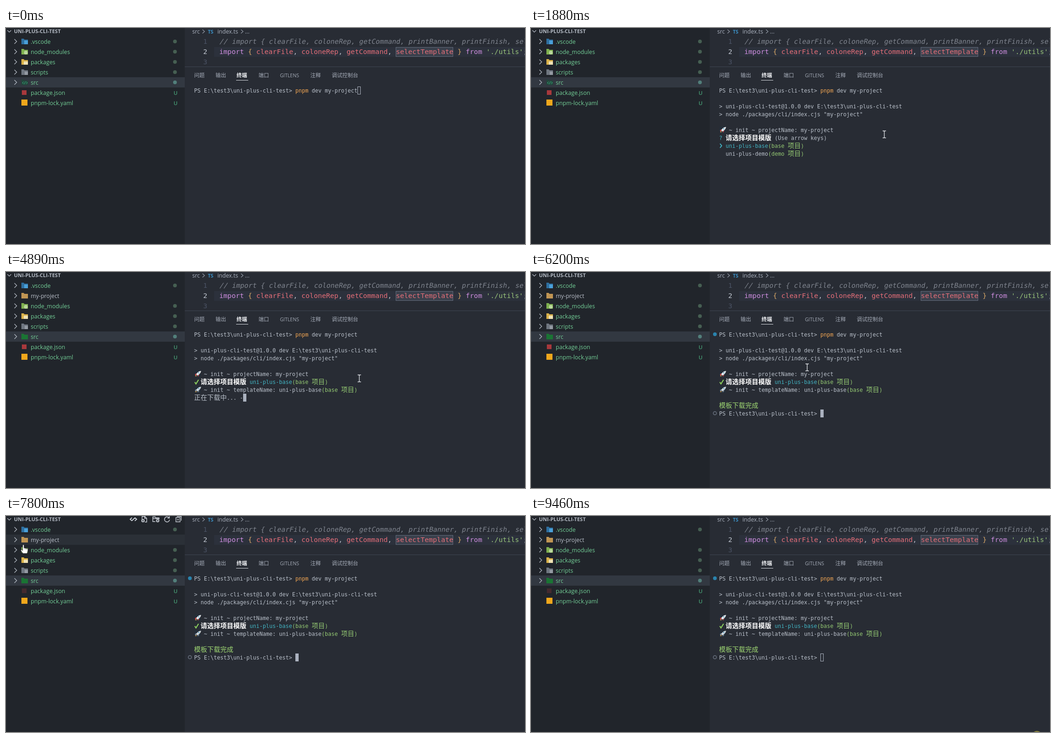
Animation, 1112 px wide and 465 px high, one loop 9.51 s. Source, as an HTML page:

```html
<!DOCTYPE html>
<html lang="zh-CN">
<head>
<meta charset="utf-8">
<title>Terminal session</title>
<style>
html, body { margin: 0; width: 100%; height: 100%; overflow: hidden; background: #282c34; }
svg { display: block; }
text { white-space: pre; }
.ui { font: 12.2px "Open Sans", "Noto Sans", sans-serif; }
.mono { font-family: "DejaVu Sans Mono", "Noto Sans Mono", monospace; font-size: 11.63px; }
.code { font: 14.62px "DejaVu Sans Mono", "Noto Sans Mono", monospace; }
.cjk { font-family: "Noto Sans CJK SC", "Noto Sans CJK", "Noto Sans CJK JP", sans-serif; }
</style>
</head>
<body>
<svg id="stage" width="1112" height="465" viewBox="0 0 1112 465"></svg>
<script>
const LOOP = 9510;
const stage = document.getElementById('stage');
const GRAY = '#b9c0ca', CYAN = '#42b3c2', GREEN = '#94c973', RED = '#e46e78', FILE = '#73cf97';

function el(tag, attrs, parent = stage, content) {
  const n = document.createElementNS('http://www.w3.org/2000/svg', tag);
  for (const k in attrs) n.setAttribute(k, attrs[k]);
  if (content !== undefined) n.textContent = content;
  parent.appendChild(n);
  return n;
}
const group = (parent = stage) => el('g', {}, parent);
const rect = (x, y, width, height, fill, parent, more) =>
  el('rect', { x, y, width, height, fill, ...more }, parent);
const circle = (cx, cy, r, fill, parent, more) => el('circle', { cx, cy, r, fill, ...more }, parent);
const path = (d, fill, parent, more) => el('path', { d, fill, ...more }, parent);
const line = (d, stroke, parent, w = 1.2) => path(d, 'none', parent, { stroke, 'stroke-width': w });
const label = (s, x, y, fill, parent, more) =>
  el('text', { x, y, fill, class: 'ui', ...more }, parent, s);
const show = (n, on) => n.setAttribute('visibility', on ? 'visible' : 'hidden');
const move = (n, x, y) => n.setAttribute('transform', `translate(${x} ${y})`);

// Terminal text sits on a 7 x 17 grid; wide characters take two cells.
const rowY = r => 134 + 17 * r;
function term(row, col, parts, parent) {
  let x = 403 + 7 * col;
  for (const [s, fill, weight = 400] of parts) {
    for (const run of s.match(/[\u4e00-\u9fff]+|[^\u4e00-\u9fff]+/g)) {
      const wide = /[\u4e00-\u9fff]/.test(run);
      el('text', {
        x, y: rowY(row) + (wide ? 5 : 4.5), fill, 'font-weight': weight,
        class: wide ? 'cjk' : 'mono', ...(wide && { 'font-size': 14 })
      }, parent, run);
      x += run.length * (wide ? 14 : 7);
    }
  }
}

function rocket(row, parent, fins, body) {
  const g = group(parent);
  move(g, 404, rowY(row) - 7);
  rect(0, 0, 13, 14, '#1f2f3d', g, { opacity: .55 });
  path('M4 6L1 8L1 11L4 10ZM8 10L6 13L9 12L10 9Z', fins, g);
  path('M14 1Q8 1 3.5 8L6 11Q13 7 14 1Z', body, g);
  path('M3 10L1 13L5 12Z', '#d9a04a', g);
  circle(9, 5, 1.3, '#4b93b8', g);
}

/* Editor */
rect(383, 0, 729, 465, '#282c34');
rect(446, 41, 666, 21, '#2c313c');
label('src', 399, 11.5, '#abb2bf');
line('M421 3.5l4.5 4l-4.5 4', '#9299a5');
label('TS', 432.5, 11.5, '#3c8fc4', stage, { style: 'font-size:10.5px;font-weight:700' });
label('index.ts', 453, 11.5, '#abb2bf');
line('M503.5 3.5l4.5 4l-4.5 4', '#9299a5');
label('...', 512, 11.5, '#abb2bf');

const code = (s, x, y, fill, more) => el('text', { x, y, fill, class: 'code', ...more }, stage, s);
[1, 2, 3].forEach(n => code(n, 422.5, 12 + 22 * n, n === 2 ? '#c3c9d3' : '#4b5365'));
code('// import { clearFile, coloneRep, getCommand, printBanner, printFinish, selectTemplate }',
  0, 0, '#7f848e', { transform: 'translate(457 34) skewX(-11)' });
rect(835.5, 41.5, 122, 20, '#3a404c', stage, { stroke: '#626b7b' });
let codeX = 457;
for (const [s, fill] of [
  ['import ', '#cf8ee0'], ['{ ', '#d8a766'], ['clearFile', RED], [', ', GRAY], ['coloneRep', RED],
  [', ', GRAY], ['getCommand', RED], [', ', GRAY], ['selectTemplate', RED], [' } ', '#d8a766'],
  ['from ', '#cf8ee0'], ["'./utils'", '#98c379'], [';', GRAY]
]) {
  code(s, codeX, 56, fill);
  codeX += 8.8 * s.length;
}

/* Panel */
rect(383, 83, 729, 1, '#3e4452');
for (const [s, x] of [['问题', 403], ['输出', 449], ['终端', 494], ['端口', 541], ['注释', 652], ['调试控制台', 698]]) {
  const active = s === '终端';
  el('text', {
    x, y: 106, class: 'cjk', 'font-size': 11.3,
    fill: active ? '#f2f4f7' : '#a5acb8', 'font-weight': active ? 700 : 400
  }, stage, s);
}
label('GITLENS', 587, 106, '#a5acb8', stage, { style: 'font-size:10.4px' });
rect(493, 112, 26, 1, '#d7dae0');

/* Terminal */
const PROMPT = 'PS E:\\test3\\uni-plus-cli-test> ';
const base = color => [['uni-plus-base', color], ['(base 项目)', GREEN]];
term(0, 0, [[PROMPT, GRAY], ['pnpm', '#f2a653'], [' dev my-project', GRAY]]);

const phases = [];
function phase(from, to, build) {
  const g = group();
  build(g);
  phases.push([g, from, to]);
}
phase(1750, LOOP, g => {
  term(2, 0, [['> uni-plus-cli-test@1.0.0 dev E:\\test3\\uni-plus-cli-test', GRAY]], g);
  term(3, 0, [['> node ./packages/cli/index.cjs "my-project"', GRAY]], g);
});
phase(1880, LOOP, g => {
  rocket(5, g, '#c9474b', '#e8ebee');
  term(5, 3, [['~ init ~ projectName: my-project', GRAY]], g);
  term(6, 2, [['请选择项目模版', '#fff', 700]], g);
});
phase(1880, 3410, g => {
  term(6, 0, [['?', CYAN]], g);
  term(6, 17, [['(Use arrow keys)', GRAY]], g);
  line('M405 249l3.5 4.5l-3.5 4.5', CYAN, g, 2);
  term(7, 2, base(CYAN), g);
  term(8, 2, [['uni-plus-demo', GRAY], ['(demo 项目)', GREEN]], g);
});
phase(3410, LOOP, g => {
  line('M404.5 237l2.5 4l5.5 -9', '#8cd05f', g, 2.2);
  term(6, 17, base(CYAN), g);
});
phase(3470, LOOP, g => {
  rocket(7, g, '#7d8a96', '#d3dade');
  term(7, 3, [['~ init ~ templateName: ', GRAY], ...base(GRAY)], g);
});
let spinner;
phase(3470, 5310, g => {
  term(8, 0, [['正在下载中', GRAY], ['... ', GRAY]], g);
  spinner = el('text', { x: 501, y: rowY(8) + 4.5, fill: GRAY, class: 'mono' }, g);
});
phase(5640, LOOP, g => {
  circle(394, 134, 4, '#2a83ad', g);
  term(9, 0, [['模板下载完成', '#9fd873']], g);
  circle(394, 304, 3.5, 'none', g, { stroke: '#69717f', 'stroke-width': 1.5 });
  term(10, 0, [[PROMPT, GRAY]], g);
});

const caret = rect(.5, .5, 6, 16, GRAY, stage, { stroke: '#abb2bf' });
// Until when, column, row; no column means hidden.
const caretStops = [
  [1230, 50, 0], [1750, 0, 1], [1880, 0, 4], [3410], [3470, 0, 7], [5310, 15, 8], [5640, 0, 8], [LOOP, 31, 10]
];

/* File tree */
rect(0, 0, 383, 465, '#21252b');
const hover = rect(0, 0, 383, 22, '#2b3037');
const selection = rect(0, 0, 383, 22, '#323841');
line('M3 5l4 4l4 -4', '#b9bfc9');
label('UNI-PLUS-CLI-TEST', 17, 11, '#b4bac4', stage, { style: 'font-size:11px;font-weight:700' });

const folder = (fill, g) => path('M33 -6h5l1.5 2h7.5v10h-14z', fill, g);
const icons = {
  '.vscode': g => { folder('#2f6f9f', g); rect(39, -2, 8, 8, '#4a9fd8', g); },
  'my-project': g => folder('#c09553', g),
  'node_modules': g => { folder('#7fb04f', g); circle(42.5, 2, 4, '#b9d79b', g); },
  'packages': g => { folder('#d9b14a', g); rect(38, -1, 9, 7, '#f1e3b4', g); },
  'scripts': g => { folder('#6f7680', g); rect(40, -1, 7, 7, '#949aa3', g); },
  'src': () => {},
  'package.json': () => {},
  'pnpm-lock.yaml': g => rect(33, -7, 13, 13, '#f0a71c', g)
};
const names = Object.keys(icons);
const rows = names.map((name, i) => {
  const g = group();
  icons[name](g);
  label(name, 53, 4.5, name === 'my-project' ? '#b9bfc9' : FILE, g);
  if (i < 6) line('M18 -5l5 5l-5 5', '#b4bac4', g, 1.3);
  if (i > 5) label('U', 359, 4.5, '#469a72', g, { style: 'font-size:11.5px;font-weight:600' });
  else if (i !== 1) circle(362, 0, 4, name === 'src' ? '#527f7b' : '#465f52', g);
  return g;
});
const srcDark = group(rows[5]), srcGreen = group(rows[5]);
folder('#24443c', srcDark);
line('M38 -1.5l-3 2.5l3 2.5M43 -1.5l3 2.5l-3 2.5M41.5 -2l-2 6', '#35b27c', srcDark, 1);
folder('#1b7434', srcGreen);
const pkgIcon = rect(34, -5, 10, 10, '#a8383c', rows[6]);

const tools = group();
line('M270 3.5l-4 3.5l4 3.5M276 3.5l4 3.5l-4 3.5M270 10l6 -6', '#c9ced6', tools, 1.8);
line('M291.5 7v-6h6l4 4v8h-4M297 1v4h4', '#c9ced6', tools, 1.4);
circle(293.5, 10, 3.5, '#c9ced6', tools);
line('M320 12h-5.5v-10h5l1.5 2h7v3M314.5 5.5h13', '#c9ced6', tools, 1.4);
circle(325, 10, 3.5, '#c9ced6', tools);
line('M291.5 10h4M293.5 8v4M323 10h4M325 8v4', '#21252b', tools, 1);
line('M349.5 4a5.5 5.5 0 1 0 1 4M350 .5v4h-4', '#c9ced6', tools, 1.5);
line('M364 3.5h9v9h-9zM366 1h9.5v9M366 8h5', '#c9ced6', tools, 1.3);

/* Pointer */
const beam = group();
line('M-3.5 -7.5h2.5l1 1l1 -1h2.5M0 -7v14M-3.5 7.5h2.5l1 -1l1 1h2.5', '#e4e7eb', beam, 1.3);
const hand = group();
path('M-1.5 1Q0 -1 1.5 1V7L4 7.5L9 9Q10 9.5 9.7 12L8 19H-1L-5.5 12.5Q-5.5 10 -3.5 11L-1.5 12.5Z',
  '#fff', hand, { stroke: '#15181c', 'stroke-width': .8 });
line('M3.5 8v3M6.3 9v2.5', '#555', hand, .6);
const halo = circle(1084, 474, 11.5, '#85803f');

const enter = [[70, 1010, 452], [200, 930, 380], [340, 800, 265], [480, 749, 228], [550, 757, 229]];
const roam = [
  [5990, 735, 228], [6200, 590, 205], [6480, 280, 140], [6680, 90, 92], [6820, 62, 83], [6960, 60, 80],
  [7300, 50, 74], [7800, 37, 61.5], [7870, 37, 61.5], [8080, 130, 95], [8400, 480, 215],
  [8840, 972, 388], [8980, 1010, 420], [9200, 1073, 456], [9260, 1078, 485]
];

// Pointer positions are sampled in steps, as a screen recorder does.
function along(points, t) {
  const start = points[0][0];
  const s = start + Math.floor((t - start) / 69.2 + .1) * 69.2;
  const i = points.findIndex(p => p[0] > s);
  if (i < 0) return points[points.length - 1].slice(1);
  const [t0, x0, y0] = points[Math.max(0, i - 1)], [t1, x1, y1] = points[i];
  const k = t1 > t0 ? Math.max(0, (s - t0) / (t1 - t0)) : 0;
  return [x0 + (x1 - x0) * k, y0 + (y1 - y0) * k];
}

// The spinner stalls between two bursts of ticks.
function spinnerChar(t) {
  const first = Math.floor((Math.min(t, 4080) - 3610) / 67 + .1);
  const second = t < 4410 ? 0 : 1 + Math.floor((t - 4410) / 69.2 + .1);
  return '|/-\\'[(Math.max(-1, first) + second + 7) % 4];
}

function draw(t) {
  for (const [g, from, to] of phases) show(g, t >= from && t < to);
  spinner.textContent = spinnerChar(t);

  const [, col, row] = caretStops.find(c => t < c[0]);
  show(caret, col !== undefined);
  if (col !== undefined) move(caret, 403 + 7 * col, rowY(row) - 8);
  caret.setAttribute('fill', t < 480 || t >= 9460 ? 'none' : '#abb2bf');

  const created = t >= 4080;
  rows.forEach((g, i) => move(g, 0, 29 + 22 * (i > 1 && !created ? i - 1 : i)));
  show(rows[1], created);
  show(srcDark, !created);
  show(srcGreen, created);
  selection.setAttribute('y', created ? 128 : 106);

  const [x, y] = t < 5990 ? along(enter, Math.max(70, t)) : along(roam, t);
  const visible = t >= 70 && y < 465;
  const inTree = visible && x < 383;
  move(beam, x, y);
  move(hand, x, y);
  show(beam, visible && !inTree);
  show(hand, inTree);
  show(tools, inTree);
  const over = Math.floor((y - 18) / 22);
  show(hover, inTree && over >= 0 && over < names.length);
  hover.setAttribute('y', 18 + 22 * over);
  pkgIcon.setAttribute('fill', t > 6400 ? '#452a2f' : '#a8383c');
  show(halo, t >= 9460);
}

const began = performance.now();
function tick() {
  draw(Math.max(0, performance.now() - began) % LOOP);
  requestAnimationFrame(tick);
}
draw(0);
requestAnimationFrame(tick);
</script>
</body>
</html>
```
